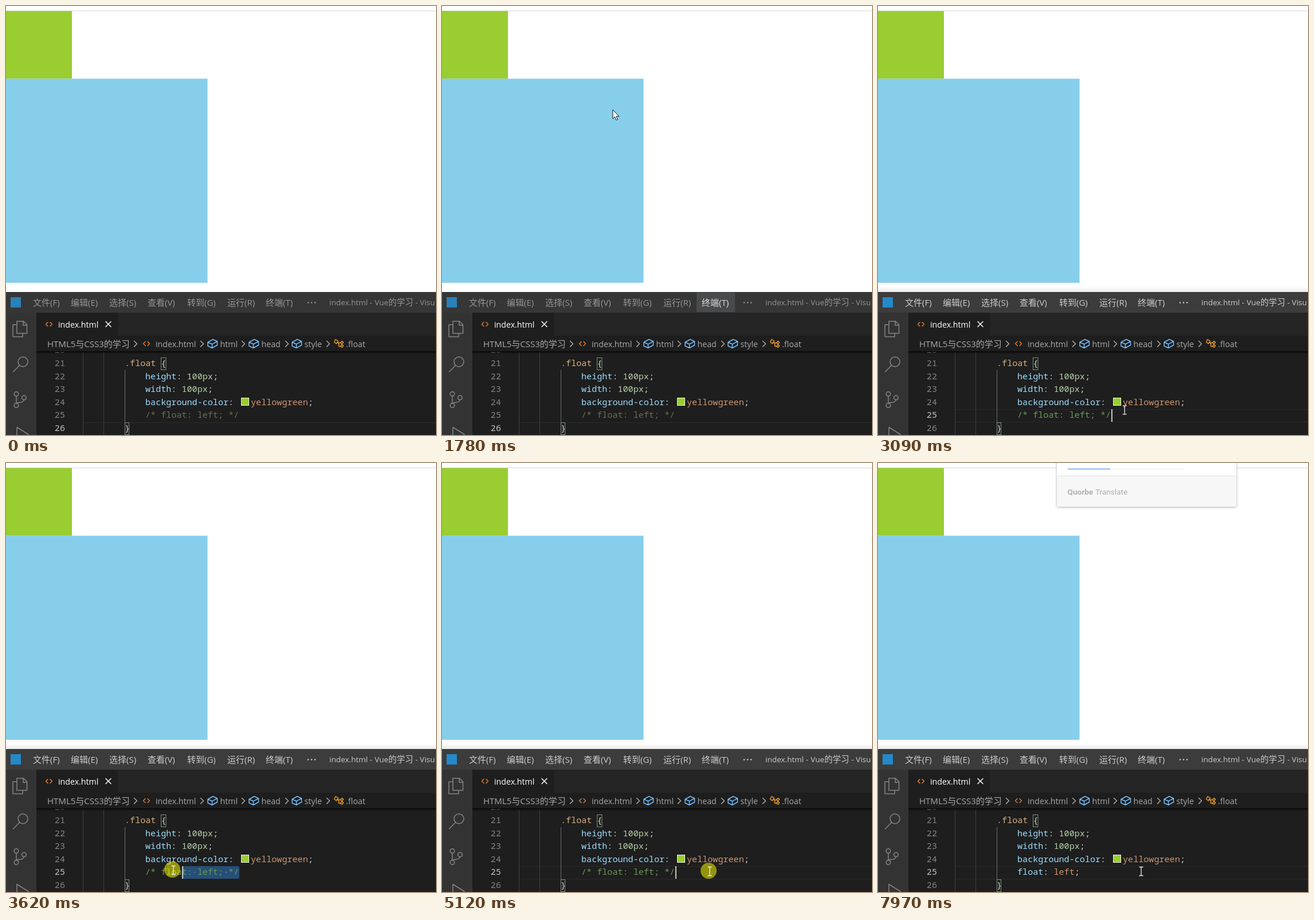
Write an HTML page that moves like this. It is 750 px wide and 747 px high and loops after 8000 ms.

```html
<!DOCTYPE html>
<html lang="zh">
<head>
<meta charset="utf-8">
<title>float</title>
<style>
html, body { margin: 0; width: 100%; height: 100%; overflow: hidden; background: #fff; }
svg { display: block; width: 750px; height: 747px; }
text { font-family: 'Open Sans', 'Noto Sans CJK SC', 'Noto Sans CJK', sans-serif; white-space: pre; }
.code { font: 500 15.12px 'Noto Sans Mono', monospace; }
.line { fill: none; stroke-width: 1.5; stroke-linejoin: round; stroke-linecap: round; }
</style>
</head>
<body>
<svg id="stage" viewBox="0 0 750 747"></svg>
<script>
const LOOP = 8000, COL = 9.072, LEFT = 243, LINE = 22.6;
const stage = document.getElementById('stage');

const rect = (x, y, w, h, fill, extra = '') =>
  `<rect x="${x}" y="${y}" width="${w}" height="${h}" fill="${fill}" ${extra}/>`;
const text = (x, y, size, fill, s, extra = '') =>
  `<text x="${x}" y="${y}" font-size="${size}" fill="${fill}" ${extra}>${s}</text>`;
const line = (d, color, extra = '') => `<path class="line" d="${d}" stroke="${color}" ${extra}/>`;
const group = (id, s, extra = '') => `<g id="${id}" ${extra}>${s}</g>`;

const baseline = n => Math.round(627 + (n - 21) * LINE);
// parts alternate: colour, text, colour, text ...
const code = (x, n, ...parts) => {
  let s = '';
  for (let i = 0; i < parts.length; i += 2) s += `<tspan fill="${parts[i]}">${parts[i + 1]}</tspan>`;
  return `<text class="code" x="${x}" y="${baseline(n)}">${s}</text>`;
};

const PROP = '#9cdcfe', PLAIN = '#d4d4d4', NUM = '#b5cea8', VALUE = '#d0966f', ICON = '#858585';

function page() {
  return rect(0, 0, 750, 500, '#fff') + rect(0, 8, 750, 1, '#d9d9d9') +
    rect(0, 8.7, 115, 118, 'yellowgreen') + rect(0, 126.6, 351.5, 355.4, 'skyblue') +
    rect(0, 488, 750, 10, 'url(#lift)', 'id="shade"');
}

function popup() {
  return group('popup',
    rect(312, -20, 313, 96, '#fff', 'rx="3" filter="url(#soft)"') +
    rect(312, 22, 313, 54, '#f7f7f7', 'rx="3"') + rect(312, 22, 313, 1, '#e4e4e4') +
    rect(331, 9.5, 74, 2, '#8ab6f0') + rect(405, 10, 130, 1, '#ececec') +
    text(330.5, 55, 13.6, '#b0b0b0', 'Quorbe', 'style="font-family:Roboto,sans-serif;font-weight:700"') +
    text(379, 55, 13.6, '#acacac', 'Translate', 'style="font-family:Roboto,sans-serif"'));
}

function titleBar() {
  const items = [[47, '文件(F)'], [113, '编辑(E)'], [180, '选择(S)'], [247, '查看(V)'],
    [316, '转到(G)'], [386, '运行(R)'], [453, '终端(T)']];
  const size = 13.5, y = 521;
  const title = text(0, y, size, 'inherit', 'index.html -') + text(79, y, size, 'inherit', 'Vue') +
    text(103, y, 14.4, 'inherit', '的学习') + text(150, y, size, 'inherit', '- Visu');
  return rect(0, 498, 750, 36, '#3c3c3c', 'id="bar"') +
    rect(444, 499, 67, 34, '#484a4b', 'id="hover"') +
    rect(8, 507, 18, 18, '#2489ca', 'id="mark"') +
    group('menu', items.map(([x, s]) => text(x, 522, 15, 'inherit', s)).join('') +
      [527, 533, 539].map(x => `<circle cx="${x}" cy="516.5" r="1.3"/>`).join('')) +
    text(453, 522, 15, '#ccc', '终端(T)', 'id="hoverText"') +
    group('title', group('unsaved', text(0, y, size, 'inherit', '●')) + group('name', title));
}

function activityBar() {
  const w = 'stroke-width="2"';
  return rect(0, 534, 53, 213, '#333') +
    line('M19 549H30.5L36.500 555V570H19ZM30 549V556H36.500M19 555H12V576H29V570', ICON, w) +
    `<circle class="line" cx="29.500" cy="619.500" r="8.500" stroke="${ICON}" ${w}/>` +
    line('M23.500 626L12.500 637', ICON, w) +
    [[18, 675.5], [31.500, 682], [18, 695.5]].map(([x, y]) =>
      `<circle class="line" cx="${x}" cy="${y}" r="3.800" stroke="${ICON}" ${w}/>`).join('') +
    line('M18 679.500V691.500M31 686C30 692 23 689 18.500 691.500', ICON, w) +
    line('M19 747V733.500L39 746', ICON, w) +
    group('badge', '<circle cx="35" cy="573" r="9" fill="#007acc"/>' +
      text(35, 577, 10.5, '#fff', '1', 'text-anchor="middle"'));
}

const angle = (x, y) => line(`M${x + 4} ${y - 3.5}l-3.500 3.500 3.500 3.500M${x + 8} ${y - 3.5}l3.500 3.500 -3.500 3.500`, '#e37933');
const chevron = x => line(`M${x - 2.500} 583.500l5 4.800 -5 4.800`, '#a9a9a9', 'stroke-width="1.200"');
const cube = x => line(`M${x} 585.500l9 -5 7.500 3.500v6.500l-9 5 -7.500 -3.500zl7.500 3.300 9 -4.800M${x + 7.5} 588.800v6.700`, '#75beff');

function tabs() {
  const c = '#a9a9a9', y = 593.5, s = 14.2;
  const branch = line('M575 580.500l4.500 3 -3.500 4.500 -3.500 -3zM578 586.500h6M580.500 586.500v6h3.500M586 583.500l2.500 2 -2.500 3 -2.500 -2zM586 589.500l2.500 2 -2.500 3 -2.500 -2z', '#ee9d28');
  return rect(53, 534, 697, 40, '#252526') + rect(53, 534, 142, 40, '#1e1e1e') +
    angle(69, 554) + text(91, 560, s, '#fff', 'index.html') +
    line('M174 549.500l9 9m0 -9l-9 9', '#fff', 'id="close"') +
    '<circle id="dot" cx="178.500" cy="554" r="5" fill="#fff"/>' +
    rect(53, 574, 697, 28, '#1e1e1e') + rect(53, 601, 697, 5, 'url(#drop)') +
    text(72, y, 15, c, 'HTML5与CSS3的学习') + angle(239, 588) + text(261, y, s, c, 'index.html') +
    [[352, 'html'], [424, 'head'], [499, 'style']].map(([x, n]) => cube(x) + text(x + 21.5, y, s, c, n)).join('') +
    [226, 342, 414, 490, 562].map(chevron).join('') + branch + text(593, y, s, c, '.float');
}

function editor() {
  let s = rect(53, 574, 697, 173, '#1e1e1e');
  s += group('current', rect(135, 0, 615, 1, '#2b2b2b') + rect(135, 22, 615, 1, '#2b2b2b'));
  s += rect(134, 602, 1, 145, '#404040') + rect(170, 602, 1, 145, '#404040') + rect(207, 634, 1, 91, '#6c6c6c');
  for (let n = 20; n <= 26; n++)
    s += `<text class="code" id="n${n}" x="103" y="${baseline(n)}" text-anchor="end" fill="#858585">${n}</text>`;
  s += rect(270.5, 612.5, 8.500, 21, '#183018', 'stroke="#888" fill-opacity=".4"');
  s += rect(207.5, 725.5, 7, 21, '#183018', 'stroke="#888" fill-opacity=".4"');
  s += rect(0, 702, 0, 22, '#264f78', 'id="select" rx="2"');
  s += code(207, 21, '#d7ae7d', '.float', PLAIN, ' {');
  s += code(LEFT, 22, PROP, 'height', PLAIN, ': ', NUM, '100px', PLAIN, ';');
  s += code(LEFT, 23, PROP, 'width', PLAIN, ': ', NUM, '100px', PLAIN, ';');
  s += code(LEFT, 24, PROP, 'background-color', PLAIN, ':');
  s += rect(410.5, 682.5, 13, 13, 'yellowgreen', 'stroke="#eee"');
  s += code(427, 24, VALUE, 'yellowgreen', PLAIN, ';');
  s += group('comment', code(LEFT, 25, 'inherit', '/* float: left; */'));
  s += group('rule', code(LEFT, 25, PROP, 'float', PLAIN, ': ', VALUE, 'left', PLAIN, ';'));
  s += code(207, 26, PLAIN, '}');
  s += [2, 9, 15].map(i => `<circle class="space" cx="${LEFT + (i + .5) * COL}" cy="712.500" r="1" fill="#6f8a9a"/>`).join('');
  return s + rect(0, 702, 2, 22, '#c8c8c8', 'id="caret"');
}

function pointers() {
  const beam = 'M-3.500 -7.500H-1Q0 -7.500 0 -6.500V6.500Q0 7.500 -1 7.500H-3.500M3.500 -7.500H1Q0 -7.500 0 -6.500M0 6.500Q0 7.500 1 7.500H3.500';
  return '<circle id="press" r="14" fill="#ff0" opacity=".52"/>' +
    '<path id="arrow" d="M.5 .5V16L4 12.700L6.500 18.500L9 17.400L6.500 11.800H11.300Z" fill="#fff" stroke="#111"/>' +
    `<path id="beam" d="${beam}" fill="none" stroke="#eee" stroke-width="1.300"/>`;
}

stage.innerHTML = `<defs>
  <linearGradient id="lift" x2="0" y2="1"><stop stop-opacity="0"/><stop offset="1" stop-opacity=".08"/></linearGradient>
  <linearGradient id="drop" x2="0" y2="1"><stop stop-opacity=".75"/><stop offset="1" stop-opacity="0"/></linearGradient>
  <filter id="soft" x="-10%" y="-20%" width="120%" height="150%"><feDropShadow dx="0" dy="1" stdDeviation="2" flood-opacity=".32"/></filter>
</defs>` + page() + popup() + editor() + tabs() + titleBar() + activityBar() + pointers();

const el = {};
stage.querySelectorAll('[id]').forEach(e => el[e.id] = e);
const spaces = [...stage.querySelectorAll('.space')];
const show = (e, on) => e.style.display = on ? '' : 'none';
const set = (e, name, v) => e.setAttribute(name, v);
const within = (t, ...spans) => spans.some(([a, b]) => t >= a && t < b);

// pointer keys: time, x, y
const PATH = [[330, 725, 690], [530, 480, 512], [660, 235, 310], [730, 165, 252],
  [1200, 155, 262], [1330, 85, 294], [1460, 66, 215], [1640, 183, 117], [1790, 315, 190],
  [1900, 280, 262], [1980, 322, 235], [2040, 335, 250], [2130, 409, 150], [2210, 300, 102],
  [2300, 187, 128], [2370, 265, 229], [2510, 265, 229], [2900, 425, 700], [3280, 440, 710],
  [3350, 438, 710], [3620, 292, 709], [3900, 254, 709], [4150, 256, 709], [4210, 268, 709],
  [4410, 247, 709], [4900, 465, 711], [4990, 467, 711], [5390, 467, 711], [5650, 459, 711], [LOOP, 459, 711]];
const STILL = [[730, 1200], [2370, 2510]];

function pointer(t) {
  let i = PATH.length - 1;
  while (i && PATH[i][0] > t) i--;
  const a = PATH[i], b = PATH[i + 1] || a;
  if (within(t, ...STILL) || a === b) return [a[1], a[2]];
  const tick = Math.floor((t - a[0]) / 65) * 65, k = tick / (b[0] - a[0]);
  return [a[1] + (b[1] - a[1]) * k, a[2] + (b[2] - a[2]) * k];
}

function draw(t) {
  const [x, y] = pointer(t);
  const active = t >= 2950, hover = within(t, [530, 2950]), dirty = within(t, [6110, 7760]);
  const done = t >= 6110, tone = active ? '#ccc' : '#959595';

  set(el.bar, 'fill', active ? '#3c3c3c' : '#363636');
  set(el.mark, 'fill', active ? '#2489ca' : '#2a80b8');
  set(el.menu, 'fill', tone);
  set(el.title, 'fill', tone);
  show(el.shade, active);
  show(el.hover, hover);
  show(el.hoverText, hover);
  set(el.name, 'transform', `translate(${dirty ? 571 : 564} 0)`);
  set(el.unsaved, 'transform', 'translate(556 0)');
  [el.unsaved, el.dot, el.badge].forEach(e => show(e, dirty));
  show(el.close, !dirty);

  set(el.n25, 'fill', active ? '#c6c6c6' : '#858585');
  set(el.n26, 'fill', active ? '#858585' : '#c6c6c6');
  set(el.comment, 'fill', active ? '#6a9955' : '#6b6e55');
  show(el.comment, !done);
  show(el.rule, done);

  let col = done ? 12 : t >= 4950 ? 18 : t >= 4210 ? 3 : 18;
  const dragging = within(t, [3350, 4210]);
  if (dragging) col = Math.max(3, Math.min(18, Math.round((x + 16 - LEFT) / COL)));
  const cx = LEFT + col * COL, picked = dragging && col < 18;
  set(el.select, 'x', cx);
  set(el.select, 'width', picked ? (18 - col) * COL + .7 : 0);
  spaces.forEach((e, i) => show(e, picked && [2, 9, 15][i] >= col));
  set(el.caret, 'x', cx + .6);
  show(el.caret, active && !within(t, [5520, 6110], [6650, 7180], [7650, LOOP]));
  set(el.current, 'transform', `translate(0 ${active ? 702 : 725})`);
  show(el.current, !picked);

  const editing = y > 602;
  show(el.arrow, t >= 330 && !editing);
  show(el.beam, t >= 330 && editing);
  set(el.arrow, 'transform', `translate(${x} ${y})`);
  set(el.beam, 'transform', `translate(${x} ${y})`);
  set(el.press, 'transform', `translate(${x - 2} ${y - 1})`);
  show(el.press, within(t, [2950, 3090], [3280, 4150], [4210, 4340], [4950, 5190]));
  show(el.popup, t >= 7970);
}

const start = performance.now();
function frame() {
  draw((performance.now() - start) % LOOP);
  requestAnimationFrame(frame);
}
frame();
</script>
</body>
</html>
```
